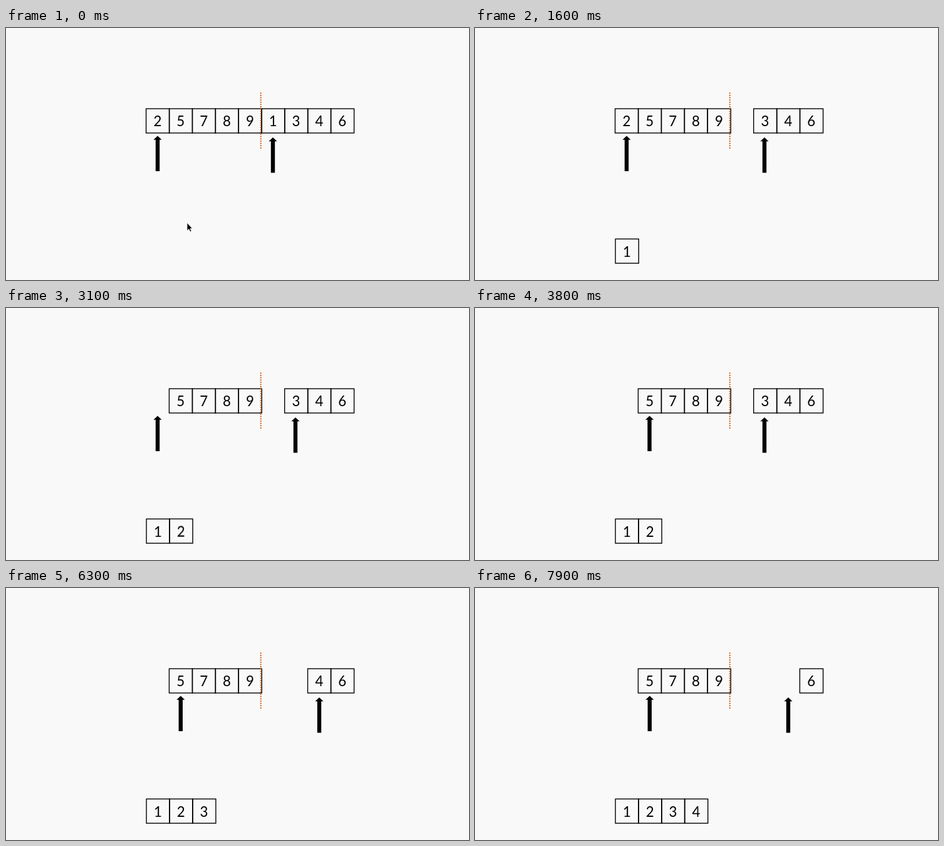
Write an HTML page that moves like this. It is 739 by 403 pixels and loops after 8 s.

```html
<!DOCTYPE html>
<html lang="en">
<head>
<meta charset="utf-8">
<title>Merging two sorted halves</title>
<style>
  html, body { margin: 0; width: 100%; height: 100%; overflow: hidden; background: #f9f9f9; }
  svg { display: block; width: 739px; height: 403px; }
  rect { fill: none; stroke: #000; stroke-width: 1.4; }
  text { font: 22.3px Lato, Carlito, sans-serif; text-anchor: middle; }
</style>
</head>
<body>
<svg viewBox="0 0 739 403">
  <defs>
    <path id="arrow" d="M0 0 L6.6 6.2 H3.2 V56.5 H-3.2 V6.2 H-6.6 Z"/>
  </defs>
  <g id="tiles"></g>
  <path d="M406.7 103.2 V194.5" stroke="#c55a11" stroke-width="2" stroke-dasharray="1.9 1.75"/>
  <use id="left" href="#arrow"/>
  <use id="right" href="#arrow"/>
  <path id="cursor" d="M289 311.5 V324.2 L291.9 321.6 L294 326 L296 325 L294 320.8 H297.6 Z"
        stroke="#fff" stroke-width=".8"/>
</svg>
<script>
const LOOP = 8000, BLUR = 12, CURSOR_HIDE = 1200;
const byId = id => document.getElementById(id);
const place = (node, x, y) => node.setAttribute('transform', `translate(${x} ${y})`);

const ease = (t, start, duration) => {
  const p = Math.min(1, Math.max(0, (t - start) / duration));
  return p * p * (3 - 2 * p);
};

// Digits that drop into the merged row: slot, start and duration
const drops = {
  1: [0, 44, 600],
  2: [1, 2500, 600],
  3: [2, 4890, 653],
  4: [3, 7250, 600]
};

function addTile(digit) {
  const tile = document.createElementNS('http://www.w3.org/2000/svg', 'g');
  tile.innerHTML = `<rect width="37.2" height="38.8"/><text x="18.4" y="28.2">${digit}</text>`;
  return byId('tiles').appendChild(tile);
}

const tiles = [2, 5, 7, 8, 9, 1, 3, 4, 6].map((digit, i) => {
  const x = 223.6 + 36.85 * i, y = 129.1;
  const tile = { x, y, drop: drops[digit], node: addTile(digit) };
  place(tile.node, x, y);
  if (tile.drop) tile.ghost = addTile(digit);
  return tile;
});

function drawDrop({ x, y, drop: [slot, start, duration], node, ghost }, t) {
  const put = (target, p) =>
    place(target, x + (224.1 + 36.8 * slot - x) * p, y + (337.4 - y) * p);
  const now = ease(t, start, duration);
  const before = ease(t - BLUR, start, duration);
  const moving = now !== before;
  put(node, now);
  put(ghost, before);
  node.setAttribute('opacity', moving ? .8 : 1);
  ghost.setAttribute('opacity', moving ? .5 : 0);
}

function draw(t) {
  tiles.filter(tile => tile.drop).forEach(tile => drawDrop(tile, t));
  place(byId('left'), 242 + 36.8 * ease(t, 3420, 400), 172.6);
  place(byId('right'), 426 + 36 * ease(t, 950, 450) + 38 * ease(t, 5760, 450), 175);
  byId('cursor').setAttribute('opacity', t < CURSOR_HIDE ? 1 : 0);
}

const begin = performance.now();
function frame() {
  draw((performance.now() - begin) % LOOP);
  requestAnimationFrame(frame);
}
frame();
</script>
</body>
</html>
```
